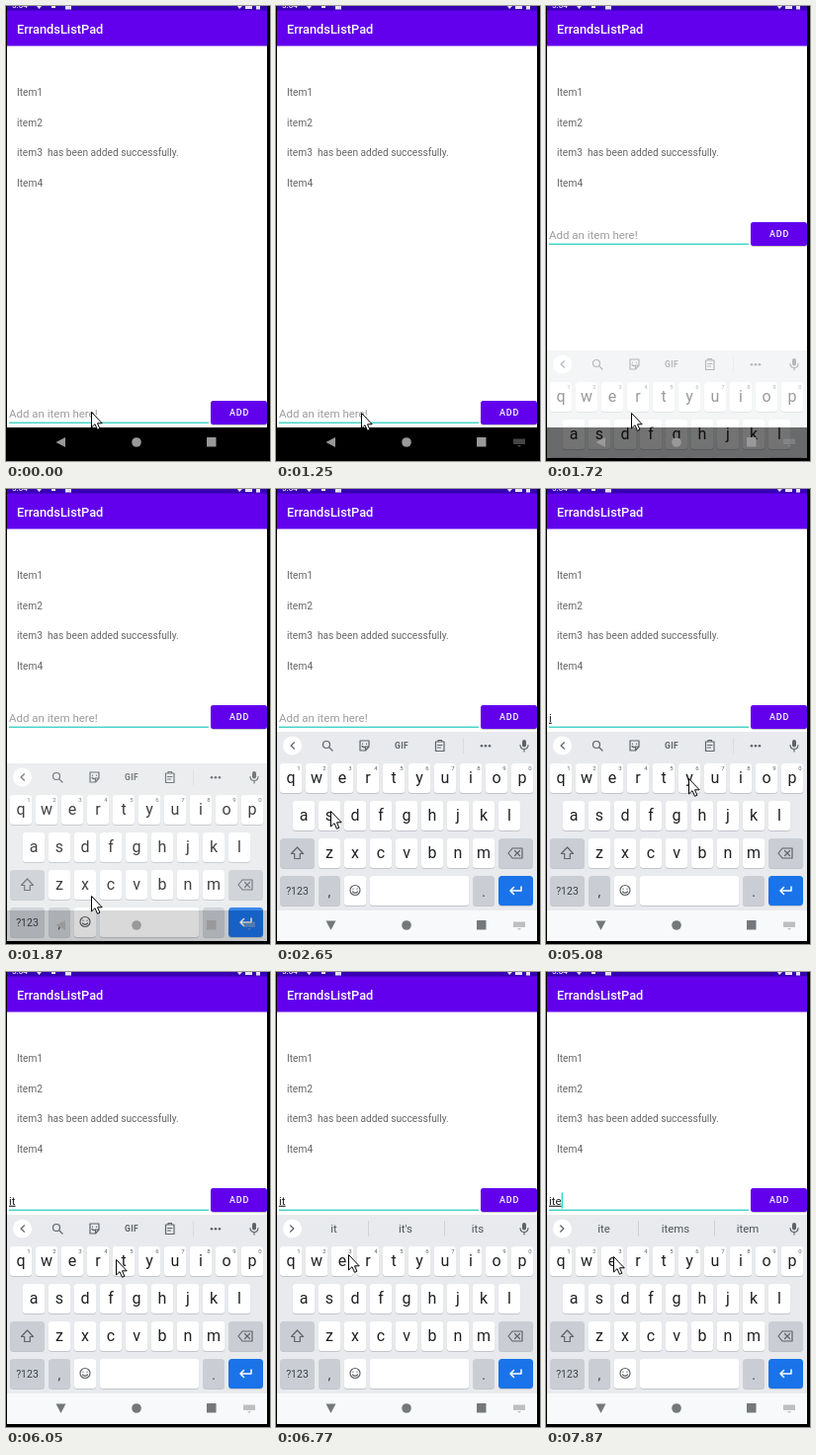
Recreate the animation shown at these times as an HTML page. Size 267 by 461 pixels, loop 8 s.

```html
<!DOCTYPE html>
<html lang="en">
<head>
<meta charset="utf-8">
<title>List app</title>
<style>
  html, body { margin: 0; width: 100%; height: 100%; overflow: hidden; background: #000; }
  svg { display: block; width: 100vw; height: 100vh; font-family: Roboto, "Noto Sans", sans-serif; }
  .mid { text-anchor: middle; }
  .line { fill: none; stroke: #5f6368; stroke-width: 1.2; stroke-linecap: round; stroke-linejoin: round; }
</style>
</head>
<body>
<svg id="stage" viewBox="0 0 267 461" preserveAspectRatio="none"></svg>
<script>
const LOOP = 8000;
const NS = "http://www.w3.org/2000/svg";
const stage = document.getElementById("stage");

function add(parent, tag, attrs = {}, text) {
  const el = document.createElementNS(NS, tag);
  for (const k in attrs) el.setAttribute(k, attrs[k]);
  if (text !== undefined) el.textContent = text;
  parent.append(el);
  return el;
}
const group = (parent, attrs) => add(parent, "g", attrs);
const box = (p, x, y, width, height, fill, rx = 0) => add(p, "rect", { x, y, width, height, fill, rx });
const label = (p, x, y, size, fill, text, more = {}) =>
  add(p, "text", { x, y, "font-size": size, fill, ...more }, text);
const path = (p, d, attrs = { class: "line" }) => add(p, "path", { d, ...attrs });
const dot = (p, cx, cy, r, fill) => add(p, "circle", { cx, cy, r, fill });
const mid = { class: "mid" };
const show = (el, on) => { el.style.display = on ? "" : "none"; };

// App screen
box(stage, 1, 0, 263, 427, "#fff");
box(stage, 1, 0, 263, 40.5, "#6200ee");
box(stage, 1, 0, 263, 4.5, "#3700b3");
label(stage, 6, 2.2, 8, "#e8e0f8", "5:04", { "font-weight": 500 });
path(stage, "M31 0h5l-2.5 3zM46 0h4v2h-4zM60 0h6v3.5h-6zM234 0h5l-3 3zM242 0h7v3h-7zM253 0h4v3.5h-4z", { fill: "#e8e0f8" });
label(stage, 11, 27.6, 12.8, "#fff", "ErrandsListPad", { "font-weight": 500 });
["Item1", "item2", "item3\u00a0 has been added successfully.", "Item4"]
  .forEach((t, i) => label(stage, 11, 91 + 30.7 * i, 10.2, "#666", t));

// Input row, drawn at its raised position
const row = group(stage);
const hint = label(row, 3, 235.7, 11.5, "#9c9c9c", "Add an item here!");
const typed = label(row, 3, 235.7, 11.5, "#222", "", { "text-decoration": "underline" });
const caret = box(row, 3, 223.5, 1.2, 16, "#03dac5");
box(row, 3, 240.6, 202, 1.3, "#2fcfc0");
box(row, 207.5, 220, 56.5, 24, "#00000038", 2.5);
box(row, 207, 219, 57, 24, "#6200ee", 2.5);
label(row, 236, 234.4, 9, "#fff", "ADD", { class: "mid", "font-weight": 500, "letter-spacing": 0.8 });

// Keyboard
const kb = group(stage);
box(kb, 1, 246, 263, 181, "#e8eaed");
box(kb, 1, 427, 263, 31, "#f8f9fa");
dot(kb, 16.5, 260, 9.5, "#fff");
const chevron = path(kb, "M2 -3.2L-1.4 0L2 3.2");

const tools = group(kb);
add(tools, "circle", { cx: 51, cy: 259, r: 3.5, class: "line" });
path(tools, "M53.8 261.8L57 265");
path(tools, "M85 255h9v6l-3.5 4H85zM90.5 265v-4H94M87.5 258v.3M91.5 258v.3M87 260.5q1.5 1.7 3.5 .6");
label(tools, 127, 263.2, 8.5, "#5f6368", "GIF", { class: "mid", "font-weight": 700, "letter-spacing": 0.3 });
path(tools, "M161.5 256h8.5v9.5h-8.5zM164 256v-1.5h3.5v1.5M163.5 259.5h4.5M163.5 262h3");
box(tools, 189, 252, 0.8, 16, "#d5d8dc");
[208, 212, 216].forEach(x => dot(tools, x, 260.3, 1.3, "#5f6368"));

const sugg = group(kb);
[93, 170].forEach(x => box(sugg, x, 252, 1, 16, "#cfd2d6"));
const words = [58.5, 131, 204].map(x => label(sugg, x, 264.4, 11.4, "#50555a", "", mid));

box(kb, 249, 254, 4, 7.5, "#5f6368", 2);
path(kb, "M247 259.5q.3 4 4 4q3.700 0 4 -4M251 264v2");

function key(x, y, w, fill = "#fff") {
  box(kb, x, y + 0.9, w, 30, "#c3c6cb", 3.5);
  box(kb, x, y, w, 30, fill, 3.5);
}
const grey = "#caced4";
[["qwertyuiop", 15, 278], ["asdfghjkl", 28, 316], ["zxcvbnm", 54, 354]].forEach(([letters, x0, y], r) => {
  [...letters].forEach((c, i) => {
    const x = x0 + 26 * i;
    key(x - 11.2, y, 22.4);
    label(kb, x, y + 20.2, 16, "#202124", c, mid);
    if (!r) label(kb, x + 8, y + 7.2, 6, "#5f6368", (i + 1) % 10, mid);
  });
});
key(4, 354, 35, grey);
path(kb, "M21.500 363l-6 6.500h3.200v5h5.600v-5h3.200z");
key(225, 354, 35, grey);
path(kb, "M235 369l4-5h10v10h-10zM241.500 366.500l5 5M246.500 366.500l-5 5");
key(4, 392, 35, grey);
label(kb, 21.5, 410.6, 10.5, "#3c4043", "?123", mid);
key(43, 392, 22, grey);
label(kb, 54, 413, 14, "#3c4043", ",", mid);
key(68.8, 392, 22.4);
add(kb, "circle", { cx: 80, cy: 406.5, r: 5, class: "line" });
path(kb, "M78 405v.3M82 405v.3M77.500 408q2.500 2.600 5 0");
key(94.8, 392, 100.4);
key(199, 392, 22, grey);
label(kb, 210, 413, 14, "#3c4043", ".", mid);
key(225, 392, 35, "#1a73e8");
path(kb, "M248 403v4h-10.500M240.500 403.500l-3.500 3.500l3.500 3.500", { class: "line", style: "stroke:#fff;stroke-width:1.5" });

const popup = group(kb);
box(popup, -16, 247, 32, 37, "#0000002a", 4);
box(popup, -15.5, 246, 31, 37, "#fff", 4);
const popupText = label(popup, 0, 270, 20, "#202124", "", mid);

// Navigation bar
const nav = group(stage);
const back = path(nav, "M-5 0L4.500 -5V5z", {});
dot(nav, 132, 442, 4.8);
box(nav, 203, 437, 9.5, 9.5, "inherit", 0.5).removeAttribute("fill");
nav.querySelector("circle").removeAttribute("fill");
const switcher = group(nav, { opacity: 0.45 });
path(switcher, "M240 438.500h12v5.500h-12zM244 445h4l-2 2z", {});

// Frame edges
box(stage, 0, 0, 1, 461, "#000");
box(stage, 264, 0, 3, 461, "#000");
box(stage, 0, 458, 267, 3, "#000");

const pointer = path(stage, "M.5 .5V16L4 12.700L6.500 18.300L8.900 17.200L6.500 11.800H11.200z",
  { fill: "#fff", stroke: "#000", "stroke-width": 1, "stroke-linejoin": "round" });

// Tables of [time, value...]; each value holds until the next time
const moves = [
  [0, 86, 411], [130, 86, 412], [2320, 80, 388], [2450, 65, 350], [2650, 55, 326],
  [2780, 76, 323], [2930, 118, 318], [3080, 160, 313], [3230, 188, 310],
  [3380, 194, 304], [3510, 196, 300], [3650, 197, 298], [3780, 197, 297],
  [4480, 206, 297], [4800, 192, 296], [4930, 172, 295], [5080, 144, 293],
  [5230, 122, 288], [6050, 111, 291], [6320, 102, 290], [6470, 90, 288],
  [6620, 81, 287], [6770, 73, 286], [6930, 71, 287], [7060, 69, 288], [7190, 68, 288]
];
const slides = [[0, 240, 0], [1720, 103, 0.45], [1850, 32, 0.85], [2050, 0, 1]];
const blinks = [
  [0, 0], [530, 1], [990, 0], [2320, 1], [2450, 0], [2930, 1], [3380, 0], [3780, 1],
  [4340, 1], [4930, 0], [5510, 1], [6050, 0], [6470, 1], [6620, 0], [7190, 1]
];
const typing = [[0, ""], [4340, "i"], [5510, "it"], [7600, "ite"]];
const presses = [[0, "", 0], [4210, "i", 197], [4480, "", 0], [5380, "t", 119], [5510, "", 0], [7470, "e", 67], [7870, "", 0]];
const guesses = [[0], [6470, "it", "it's", "its"], [7870, "ite", "items", "item"]];

const at = (table, t) => table.findLast(s => s[0] <= t).slice(1);

function draw(t) {
  const [x, y] = at(moves, t);
  pointer.setAttribute("transform", `translate(${x} ${y})`);

  const [drop, alpha] = at(slides, t);
  kb.setAttribute("transform", `translate(0 ${drop})`);
  kb.setAttribute("opacity", alpha);
  row.setAttribute("transform", `translate(0 ${t < 1720 ? 181 : 0})`);

  const [text] = at(typing, t);
  typed.textContent = text;
  show(hint, !text);
  caret.setAttribute("x", text ? 3 + typed.getComputedTextLength() : 3);
  show(caret, at(blinks, t)[0]);

  const [letter, px] = at(presses, t);
  show(popup, letter);
  popup.setAttribute("transform", `translate(${px} 0)`);
  popupText.textContent = letter;

  const list = at(guesses, t);
  const open = list.length > 0;
  words.forEach((w, i) => { w.textContent = list[i] || ""; });
  show(sugg, open);
  show(tools, !open);
  chevron.setAttribute("transform", `translate(16.5 260) scale(${open ? -1 : 1} 1)`);

  nav.setAttribute("fill", t < 2050 ? "#999" : "#75787b");
  back.setAttribute("transform", `translate(55.5 442) rotate(${t < 2320 ? 0 : -90})`);
  show(switcher, t >= 990);
}

function tick() {
  draw(performance.now() % LOOP);
  requestAnimationFrame(tick);
}
tick();
</script>
</body>
</html>
```
